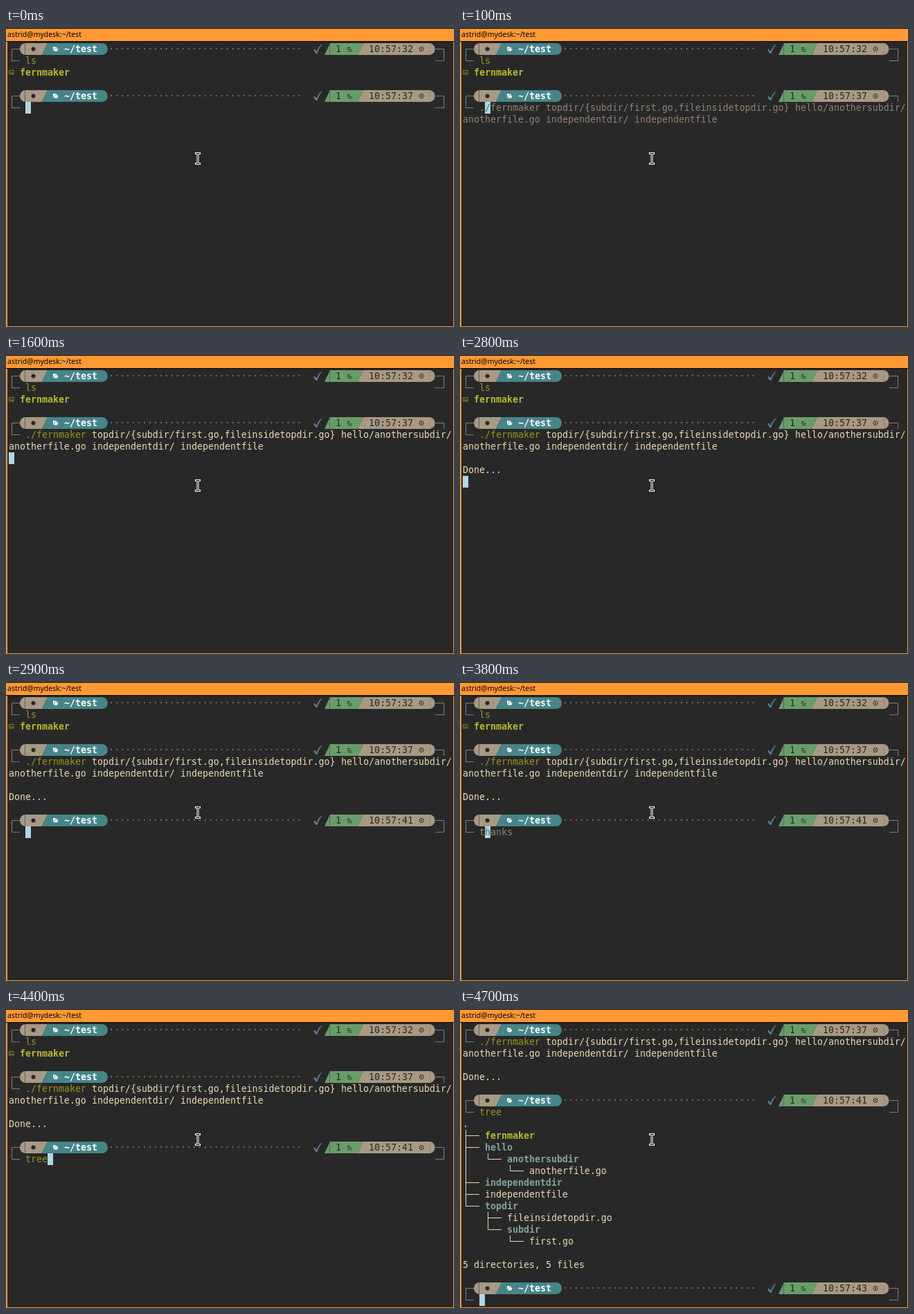
An HTML page that plays this animation: 647x433 px, repeating every 8 s.

```html
<!DOCTYPE html>
<html lang="en">
<head>
<meta charset="utf-8">
<title>Terminal</title>
<style>
  html, body { margin: 0; width: 100%; height: 100%; overflow: hidden; background: #282828; }
  #stage { position: absolute; left: 0; top: 0; width: 647px; height: 433px; overflow: hidden; background: #282828; }
  svg { position: absolute; left: 0; top: 0; }
  .t { position: absolute; white-space: pre; font: 13.288px/17px "DejaVu Sans Mono", monospace; color: #ebdbb2; }
  .b { font-weight: bold; }
  .olive { color: #98971a; }
  .path { color: #98971a; text-decoration: underline; text-decoration-thickness: 1px; text-underline-offset: 1px; }
  .exe { color: #b8bb26; }
  .dir { color: #83a598; }
  .err { color: #fb4934; }
  .hint { color: #928374; }
  .dots { color: #857a66; }
  .dark { color: #282828; }
  .white { color: #fff; }
  .under { color: #44708a; }
  #bar { position: absolute; left: 0; top: 0; width: 647px; height: 20px; background: #ff9933; border: solid #000; border-width: 1px 0; box-sizing: border-box; }
  #bar span { position: absolute; left: 2px; top: 0; white-space: pre; font: 10.5px/17px "Noto Sans", "Open Sans", sans-serif; color: #000; }
  #edge { position: absolute; left: 0; top: 20px; width: 647px; height: 413px; box-sizing: border-box; border: solid #ff9933; border-width: 0 1px 1px 2px; }
</style>
</head>
<body>
<div id="stage">
  <div id="screen"></div>
  <div id="bar"><span>astrid@mydesk:~/test</span></div>
  <div id="edge"></div>
  <svg width="647" height="433" fill="none">
    <path d="M274.5 181.5h5M277 181.5v15M274.5 196.5h5" stroke="#fff" stroke-width="3" stroke-linecap="square"/>
    <path d="M274.5 181.5h5M277 181.5v15M274.5 196.5h5" stroke="#111" stroke-width="1" stroke-linecap="square"/>
  </svg>
</div>
<script>
const LOOP = 8000, CELL = 8, ROW = 17;
const X = col => 4 + col * CELL;
const Y = row => 22 + row * ROW;
const TAN = '#a89984', TEAL = '#458588', GREEN = '#689d6a', INK = '#282828', FRAME = '#808080';
const APP = 'fernmaker';
const ARGS = [' topdir/{subdir/first.go,fileinsidetopdir.go} hello/anothersubdir/',
              'anotherfile.go independentdir/ independentfile'];

// Every word starts on the character grid.
const text = (row, col, str, cls = '') =>
  [...str.matchAll(/\S+/g)].map(word =>
    `<div class="t ${cls}" style="left:${X(col + word.index)}px;top:${Y(row)}px">${word[0]}</div>`).join('');
const svg = body => `<svg width="647" height="433" fill="none">${body}</svg>`;
const fill = (d, color) => `<path d="${d}" fill="${color}"/>`;
const line = (d, color, w = 1) => `<path d="${d}" stroke="${color}" stroke-width="${w}"/>`;

function cursor(row, col, ch = '') {
  return svg(`<rect x="${X(col)}" y="${Y(row)}" width="8" height="17" fill="#add8e6"/>`) +
    text(row, col, ch, 'under');
}

// Two-line prompt; a long command hides the lower right corner.
function prompt(row, time, open = false) {
  const y = Y(row), b = y + ROW, m = y + 8.5;
  const shapes =
    line(`M20 ${m}H8.5V${m + ROW}H20`, FRAME) +
    line(`M620 ${m}H632.5V${open ? b : m + ROW}${open ? '' : 'H620'}`, FRAME) +
    fill(`M28 ${y}A8 8.5 0 0 0 28 ${b}Z`, TAN) +
    fill(`M28 ${y}H60L52 ${b}H28Z`, TAN) +
    fill(`M60 ${y}H139A8 8.5 0 0 1 139 ${b}H52Z`, TEAL) +
    fill(`M468 ${y}H516L508 ${b}H460Z`, GREEN) +
    fill(`M516 ${y}H611.5A8 8.5 0 0 1 611.5 ${b}H508Z`, TAN) +
    line(`M27.5 ${y}V${b}`, '#6b6052') +
    line(`M467.5 ${y}V${b}`, '#4b6b4c') +
    line(`M612.5 ${y}V${b}`, '#978672') +
    `<circle cx="39.5" cy="${m}" r="3" fill="${INK}"/>` +
    fill(`M68 ${y + 5}h3l1 1h2v1.5h-4l-1.5 3h-.5Z`, '#fff') +
    fill(`M70.5 ${y + 8}h5l-1.5 3.500h-5Z`, '#fff') +
    fill(`M444 ${y + 10}l2-1.5 2.500 3.500q2.500-7 7.500-10.500l.5.5q-4.500 5-7 13h-2Z`, '#5d7d8f') +
    line(`M493 ${y + 6.5}h4M492.5 ${y + 9}q1.8-1.500 3.500 0t3.500 0M493.500 ${y + 11.500}q1.500-1.200 3 0t3 0`, INK) +
    `<circle cx="600" cy="${m}" r="3" stroke="${INK}"/>` +
    `<circle cx="600" cy="${m}" r="1" fill="${INK}"/>`;
  return svg(shapes) +
    text(row, 10, '~/test', 'b white') +
    text(row, 18, '·'.repeat(35), 'dots') +
    text(row, 59, '1', 'dark') +
    text(row, 65, time, 'dark');
}

const listing = prompt(0, '10:57:32') + text(1, 3, 'ls', 'olive') +
  svg(`<rect x="4.5" y="61.5" width="6.5" height="5.5" stroke="#7d7f2a"/>` +
      line('M6 63l1.500 1.500-1.500 1.500M8 65.500h2', '#98971a')) +
  text(2, 2, APP, 'b exe');

// Command line split into a typed part and its completion.
function command(row, typed, typedCls, rest, restCls) {
  const col = 3 + typed.length;
  return text(row, 3, typed, typedCls) + text(row, col, rest, restCls) + text(row + 1, 0, ARGS[1], restCls);
}
const ran = row => command(row, './' + APP, 'olive', ARGS[0], '');

function suggest(typed, cls) {
  const full = './' + APP + ARGS[0], n = typed.length;
  return listing + prompt(4, '10:57:37', true) +
    command(5, typed, cls, ' ' + full.slice(n + 1), 'hint') + cursor(5, 3 + n, full[n]);
}

const running = listing + prompt(4, '10:57:37', true) + ran(5);
const done = running + text(8, 0, 'Done...');
const ready = done + prompt(10, '10:57:41');

function typing(typed, rest, cls = 'olive') {
  const n = typed.length;
  return ready + text(11, 3, typed, cls) + text(11, 4 + n, rest.slice(1), 'hint') +
    cursor(11, 3 + n, rest.charAt(0));
}

// Each entry: name, depth, class, last among its siblings.
const TREE = [
  [APP, 0, 'b exe'], ['hello', 0, 'b dir'], ['anothersubdir', 1, 'b dir', 1],
  ['anotherfile.go', 2, '', 1], ['independentdir', 0, 'b dir'], ['independentfile', 0, ''],
  ['topdir', 0, 'b dir', 1], ['fileinsidetopdir.go', 1, ''], ['subdir', 1, 'b dir', 1],
  ['first.go', 2, '', 1]
];

function tree(top) {
  let names = '', d = '';
  const ended = [];
  TREE.forEach(([name, depth, cls, last], i) => {
    const row = top + i, y = Y(row), m = y + 8.5, x = X(depth * 4) + 4.5;
    ended[depth] = last;
    for (let k = 0; k < depth; k++) {
      if (!ended[k]) d += `M${X(k * 4) + 4.5} ${y}v${ROW}`;
    }
    d += `M${x} ${y}V${last ? m : y + ROW}M${x} ${m}H${X(depth * 4 + 3)}`;
    names += text(row, depth * 4 + 4, name, cls);
  });
  return svg(line(d, '#ebdbb2')) + names;
}

const result = prompt(0, '10:57:37', true) + ran(1) + text(4, 0, 'Done...') +
  prompt(6, '10:57:41') + text(7, 3, 'tree', 'olive') + text(8, 0, '.') + tree(9) +
  text(20, 0, '5 directories, 5 files') + prompt(22, '10:57:43') + cursor(23, 3);

const STEPS = [
  [0, listing + prompt(4, '10:57:37') + cursor(5, 3)],
  [100, suggest('.', 'olive')],
  [300, suggest('./', 'path')],
  [1600, running + cursor(7, 0)],
  [2800, done + cursor(9, 0)],
  [2900, typing('', '')],
  [3800, typing('t', 'hanks')],
  [4000, typing('tr', 'ee')],
  [4300, typing('tre', 'e', 'b err')],
  [4400, typing('tree', '')],
  [4700, result]
];

const screenEl = document.getElementById('screen');
const start = performance.now();
let shown = -1;

function draw() {
  const t = Math.max(0, performance.now() - start) % LOOP;
  let i = STEPS.length - 1;
  while (STEPS[i][0] > t) i--;
  if (i !== shown) {
    screenEl.innerHTML = STEPS[i][1];
    shown = i;
  }
  requestAnimationFrame(draw);
}
draw();
</script>
</body>
</html>
```
